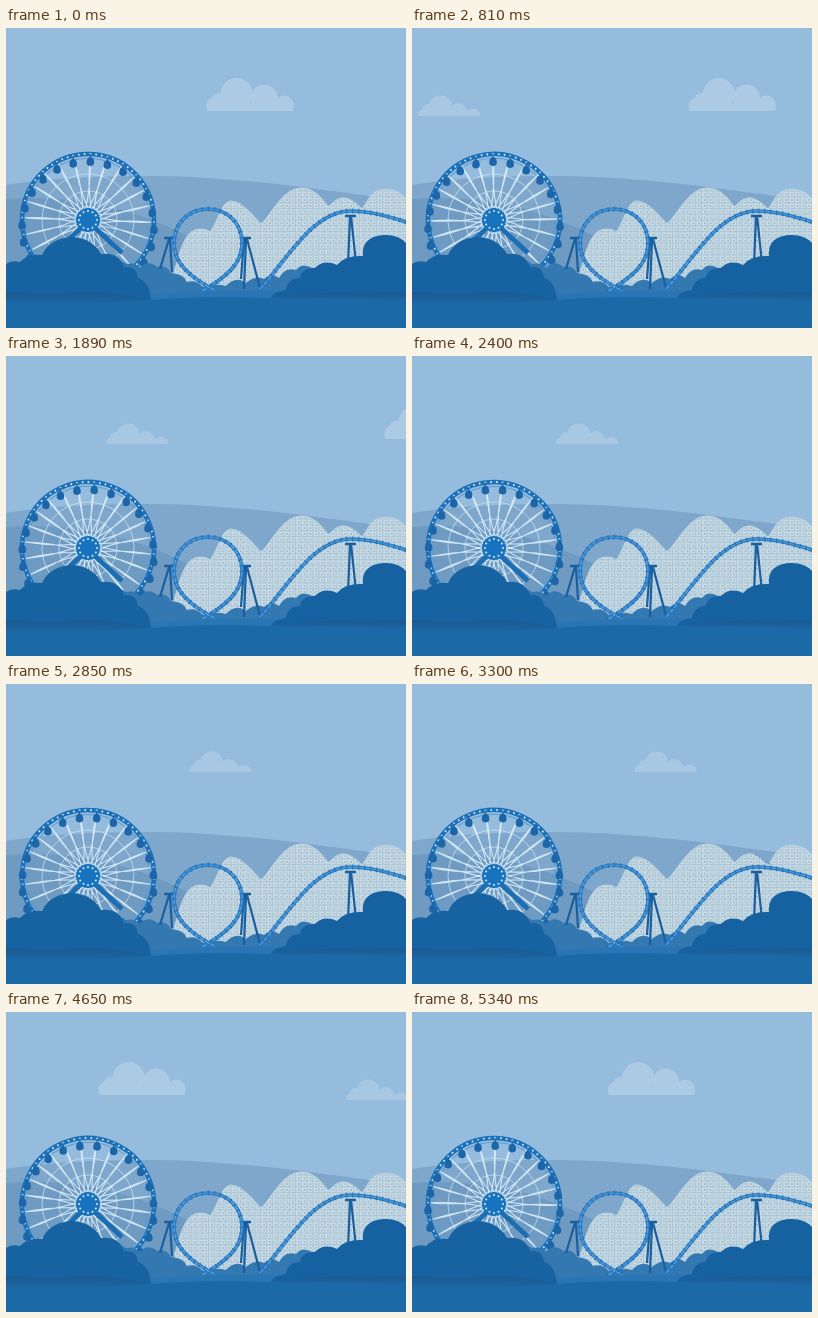
Animation, 400 px wide and 300 px high, one loop 5370 ms. Source, as an HTML page:

```html
<!DOCTYPE html>
<html lang="en">
<head>
<meta charset="utf-8">
<title>Amusement park</title>
<style>
html, body { margin: 0; width: 100%; height: 100%; overflow: hidden; background: #95bbdd; }
svg { display: block; width: 100vw; height: 100vh; }
</style>
</head>
<body>
<svg viewBox="0 0 400 300" preserveAspectRatio="none">
  <defs>
    <linearGradient id="shade" x1="0" y1="0" x2="0" y2="1">
      <stop offset="0" stop-color="#1b5a92"/><stop offset=".5" stop-color="#1c5f99"/><stop offset="1" stop-color="#1c69a7"/>
    </linearGradient>
    <pattern id="lattice" width="5.8" height="5.8" patternUnits="userSpaceOnUse">
      <rect width="5.8" height="5.8" fill="#a3c1d6"/>
      <path d="M0 0H5.800M0 0V5.800" stroke="#cfdfe6" stroke-width="1.2"/>
      <circle cx="2.900" cy="2.900" r="1.700" fill="#9db9cc" stroke="#dbe7e8" stroke-width="1"/>
    </pattern>
    <clipPath id="bigClip"><rect width="88" height="83"/></clipPath>
    <clipPath id="smallClip"><rect width="63" height="88"/></clipPath>
  </defs>

  <rect width="400" height="300" fill="#95bbdd"/>
  <g id="bigCloud" fill="#fff" opacity=".22"><g clip-path="url(#bigClip)">
    <circle cx="8" cy="78" r="8"/><circle cx="13" cy="73" r="8"/><circle cx="30.500" cy="66" r="16"/>
    <circle cx="58" cy="70" r="13.500"/><circle cx="78" cy="77" r="9.500"/><rect x="1" y="75" width="86" height="8"/>
  </g></g>
  <g id="smallCloud" fill="#fff" opacity=".18"><g clip-path="url(#smallClip)">
    <circle cx="6" cy="87" r="6"/><circle cx="10" cy="82" r="6"/><circle cx="22.500" cy="79" r="11.500"/>
    <circle cx="40" cy="84" r="9"/><circle cx="55" cy="88" r="7.500"/><rect x="2" y="83" width="52" height="5"/>
  </g></g>

  <path d="M0 157C45 150 90 148 140 148C230 148 310 161 400 173V300H0Z" fill="#7fa7cc"/>
  <path d="M0 171C70 166 125 182 165 200C210 222 250 234 300 240V300H0Z" fill="#6f9ac2"/>

  <g transform="translate(0 1)">
    <path d="M166 249L255 194L322 177L357 179L400 170V262H166Z" fill="url(#lattice)"/>
    <path id="backTrack" d="M400 170C392 160 381 159 374 161C364 163 361 174 356 180C350 174 343 168 336 169C329 170 327 174 322 178C316 168 307 159 296 159C276 159 267 184 255 195C246 185 235 172 225 172C215 172 212 194 204 203C199 199 191 199 185 203C175 212 173 228 166 250" fill="url(#lattice)" stroke="#c5d9e5" stroke-width=".8"/>
    <g id="backTrain" fill="#6d9fcc"></g>
  </g>

  <g transform="translate(82 192)">
    <g id="turning">
      <circle r="66" fill="none" stroke="#1a70b9" stroke-width="4.500"/>
      <circle r="61.500" fill="none" stroke="#5c9dd2" stroke-width="1"/>
      <circle r="46" fill="none" stroke="#c9e2f4" stroke-width=".7"/>
      <circle r="29" fill="none" stroke="#c9e2f4" stroke-width=".7"/>
      <path id="spokes" fill="none" stroke="#d3e9f8" stroke-width="1.050"/>
      <g id="bulbs" fill="#d8ecfa"></g>
    </g>
    <path d="M-7 8L-34 33M7 8L34 33" stroke="#1c6db2" stroke-width="5"/>
    <g id="gondolas" fill="#1b65a8"></g>
    <circle r="12" fill="#1873bf"/>
    <g id="hub" fill="#d8ecfa"></g>
  </g>

  <path d="M96 268V238Q106 226 120 236Q130 234 134 240Q142 231 151 239Q160 236 165 245Q178 246 181 254Q190 251 197 259Q210 255 220 258Q230 247 240 255Q249 247 258 251Q266 244 273 250Q279 239 290 242Q296 234 306 240L400 235V290H96Z" fill="#3478b2"/>

  <g fill="none" stroke="#1a5f9e" transform="translate(0 1)">
    <path d="M163 210L154 240M164 210L166 243M240 210L238 260M241 210L254 259M238 210L235 250M344 187L342 236M345 187L350 234" stroke-width="2.200"/>
    <path d="M158 209H168M235 209H245M339 187H350" stroke-width="2.500"/>
  </g>
  <path id="track" d="M400 194C382 188 364 183 345 183C312 183 289 218 262 252L254 261M195 264C224 247 236 234 236 215C236 195 221 181 202 181C183 181 168 195 168 215C168 234 181 248 212 264" fill="none" stroke="#2679c2" stroke-width="3.600"/>
  <g fill="none">
    <path id="rail" stroke="#5fa5dd" stroke-width="1.100"/>
    <path id="ties" stroke="#2070b7" stroke-width="4.800" stroke-dasharray="1 5"/>
  </g>

  <path d="M130 268Q200 260 300 264V300H130Z" fill="#2a75b3"/>
  <path d="M0 236Q5 232 14 234Q22 225 36 227Q44 210 66 209Q86 210 95 226Q113 224 118 239Q131 238 132 250Q143 253 145 272H0Z" fill="#1763a2"/>
  <path d="M265 270Q268 263 280 262Q282 250 294 250Q296 239 309 240Q318 231 331 237Q339 227 357 228Q355 209 377 207Q392 206 400 215V272H265Z" fill="#1661a0"/>
  <path d="M0 272Q70 276 145 272Q200 267 265 270L400 269V300H0Z" fill="#1c69a7"/>
  <path d="M0 264Q45 268 80 264Q118 265 145 272Q85 277 45 276Q20 278 0 275Z" fill="url(#shade)"/>
  <path d="M264 270Q310 263 400 265V273Q330 270 264 270Z" fill="url(#shade)"/>
</svg>
<script>
const LOOP = 5370, GONDOLAS = 24, STEP = 360 / GONDOLAS;
const TURN = 180, START_ANGLE = 2;
const $ = id => document.getElementById(id);
const polar = (r, deg) => {
  const a = deg * Math.PI / 180;
  return [r * Math.sin(a), -r * Math.cos(a)];
};
const point = (r, deg) => polar(r, deg).map(v => v.toFixed(2)).join(' ');
const make = (parent, tag, attrs) => {
  const node = document.createElementNS('http://www.w3.org/2000/svg', tag);
  for (const key in attrs) node.setAttribute(key, attrs[key]);
  return parent.appendChild(node);
};
const dotRing = (parent, count, radius, r) => {
  for (let i = 0; i < count; i++) {
    const [cx, cy] = polar(radius, i * 360 / count);
    make(parent, 'circle', { cx, cy, r });
  }
};

dotRing($('bulbs'), 72, 66, 1);
dotRing($('hub'), 12, 9, 1);

// Each hub point sends two crossing curves to the neighbouring rim points.
let spokes = '';
for (let i = 0; i < GONDOLAS; i++) {
  const a = i * STEP;
  for (const side of [-1, 1]) {
    spokes += `M${point(11, a)}Q${point(36, a + side * STEP * 1.2)} ${point(63, a + side * STEP)}`;
  }
}
$('spokes').setAttribute('d', spokes);

const gondolas = Array.from({ length: GONDOLAS }, () =>
  make($('gondolas'), 'path', { d: 'M-.6 0H.6V3Q3.500 4 3.700 7V10Q2.500 12 0 12Q-2.500 12 -3.700 10V7Q-3.500 4 -.6 3Z' }));
const cars = Array.from({ length: 5 }, () => make($('backTrain'), 'circle', { r: 1.2 }));

const backTrack = $('backTrack'), backLength = backTrack.getTotalLength();
for (const id of ['rail', 'ties']) $(id).setAttribute('d', $('track').getAttribute('d'));

const slide = (node, x) => node.setAttribute('transform', `translate(${x.toFixed(2)} 0)`);

function draw(t) {
  slide($('bigCloud'), t < 2800 ? 200 + t * 0.0942 : 200 - (LOOP - t) * 0.15);
  slide($('smallCloud'), -64.5 + t * 0.0869);

  const angle = START_ANGLE + TURN * t / LOOP;
  $('turning').setAttribute('transform', `rotate(${angle})`);
  gondolas.forEach((gondola, i) => {
    const [x, y] = polar(66, angle + i * STEP);
    gondola.setAttribute('transform', `translate(${x} ${y})`);
  });

  cars.forEach((car, i) => {
    const d = (t - 2950) / 1750 * (backLength + 20) - i * 4;
    const visible = d > 0 && d < backLength;
    car.setAttribute('visibility', visible ? 'visible' : 'hidden');
    if (!visible) return;
    const p = backTrack.getPointAtLength(d);
    car.setAttribute('cx', p.x);
    car.setAttribute('cy', p.y - 1);
  });
}

const start = performance.now();
function tick() {
  draw((performance.now() - start) % LOOP);
  requestAnimationFrame(tick);
}
tick();
</script>
</body>
</html>
```
